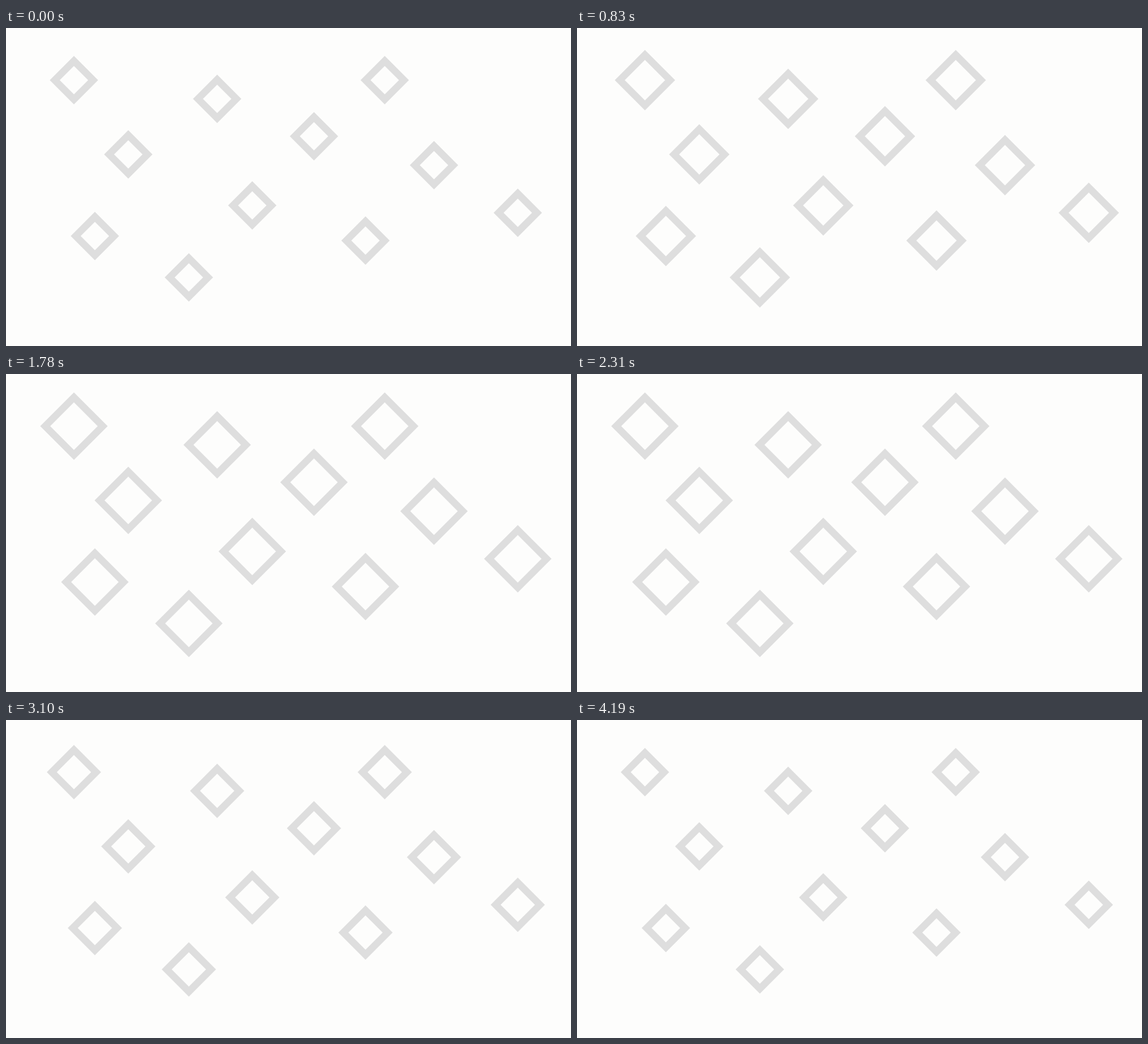
An HTML page with a canvas for the animation above (4.3 s loop, 998 by 561 pixels).

```html
<!DOCTYPE html>
<html lang="en">
<head>
<meta charset="utf-8">
<title>Pulsing diamonds</title>
<style>
  html, body { margin: 0; width: 100%; height: 100%; overflow: hidden; background: #fdfdfc; }
  canvas { display: block; }
</style>
</head>
<body>
<canvas id="stage" width="998" height="561"></canvas>
<script>
const ctx = document.getElementById('stage').getContext('2d');
const LOOP = 4300, HALF = LOOP / 2, DELAY = 68;
const R_MIN = 42.7, R_MAX = 60, BAND = 17.6;

// centre of each diamond, left to right
const centers = [
  [120, 92], [157, 367], [216, 223], [323, 440], [373, 125], [435, 313],
  [544, 191], [635, 375], [669, 92], [756, 242], [904, 326]
];

// cubic-bezier(.25, .1, .25, 1), solved by bisection
function ease(x) {
  let lo = 0, hi = 1, s = 0.5;
  for (let i = 0; i < 30; i++) {
    s = (lo + hi) / 2;
    if (0.75 * s * (1 - s) + s ** 3 < x) lo = s;
    else hi = s;
  }
  return 0.3 * s * (1 - s) ** 2 + 3 * s * s * (1 - s) + s ** 3;
}

function radiusAt(time) {
  const t = (time - DELAY + LOOP) % LOOP;
  const k = t < HALF ? ease(t / HALF) : 1 - ease((t - HALF) / HALF);
  return R_MIN + (R_MAX - R_MIN) * k;
}

function diamond(x, y, r) {
  ctx.moveTo(x, y - r);
  ctx.lineTo(x + r, y);
  ctx.lineTo(x, y + r);
  ctx.lineTo(x - r, y);
  ctx.closePath();
}

function draw(time) {
  const r = radiusAt(time);
  ctx.fillStyle = '#fdfdfc';
  ctx.fillRect(0, 0, 998, 561);
  ctx.fillStyle = '#dedede';
  ctx.beginPath();
  for (const [x, y] of centers) {
    diamond(x, y, r);
    diamond(x, y, r - BAND);
  }
  ctx.fill('evenodd');
}

const start = performance.now();
function tick() {
  draw((performance.now() - start) % LOOP);
  requestAnimationFrame(tick);
}
tick();
</script>
</body>
</html>
```
